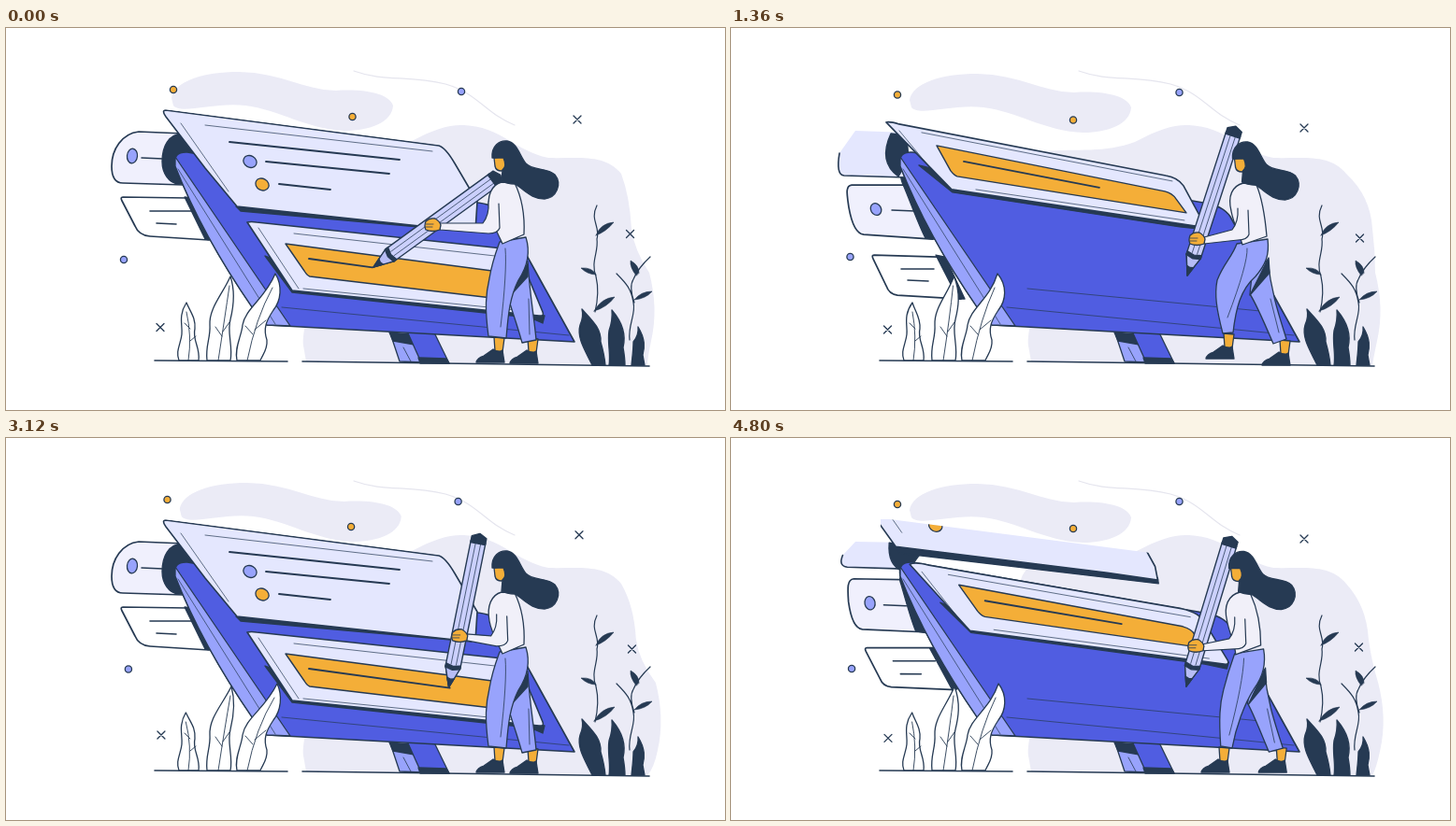
These frames come from a looping animation (769 by 409 pixels, 4880 ms). An HTML page with a canvas:

```html
<!DOCTYPE html>
<html lang="en">
<head>
<meta charset="utf-8">
<title>Card board</title>
<style>
html, body { margin: 0; height: 100%; overflow: hidden; background: #fff; }
canvas { display: block; }
</style>
</head>
<body>
<canvas width="769" height="409"></canvas>
<script>
const g = document.querySelector('canvas').getContext('2d');
const NAVY = '#263a53', BLUE = '#505de1', SKY = '#98a3fc', PALE = '#e4e7fe',
      MIST = '#ebebf6', GOLD = '#f4ae38', SHIRT = '#f1f0f9';
const LOOP = 4880;
const NUM = /-?\d+(\.\d+)?/g;
const TIMES = [0, .64, .85, 1.26, 1.36];

// The scene runs forward, backward, then forward again before the cut.
const phaseAt = ms => (ms < 1870 ? ms : ms < 3645 ? 3740 - ms : ms - 3550) / 1000;

// Smooth keyframe track, flat at both ends.
function track(p, v, times = TIMES) {
  const last = v.length - 1;
  if (p <= times[0]) return v[0];
  if (p >= times[last]) return v[last];
  const i = times.findIndex(x => x > p) - 1, h = times[i + 1] - times[i], k = (p - times[i]) / h;
  const slope = j => {
    if (j === 0 || j === last) return 0;
    const a = (v[j] - v[j - 1]) / (times[j] - times[j - 1]);
    const b = (v[j + 1] - v[j]) / (times[j + 1] - times[j]);
    return a * b <= 0 ? 0 : 2 * a * b / (a + b);
  };
  return v[i] + (v[i + 1] - v[i]) * k * k * (3 - 2 * k)
    + h * k * (1 - k) * (slope(i) * (1 - k) - slope(i + 1) * k);
}

// Blends paths that share the same commands.
function morph(s, ...paths) {
  const i = Math.max(0, Math.min(paths.length - 2, Math.floor(s)));
  const to = paths[i + 1].match(NUM);
  let n = 0;
  return paths[i].replace(NUM, v => (+v + (to[n++] - v) * (s - i)).toFixed(2));
}

function shape(d, fill, line = NAVY, width = 1.3) {
  const path = new Path2D(d);
  if (fill) { g.fillStyle = fill; g.fill(path); }
  if (line) { g.strokeStyle = line; g.lineWidth = width; g.stroke(path); }
}
const stroke = (d, width = 1.8) => shape(d, null, NAVY, width);

function oval(x, y, rx, ry, fill, tilt = 0) {
  g.beginPath();
  g.ellipse(x, y, rx, ry, tilt, 0, 7);
  g.fillStyle = fill; g.fill();
  g.strokeStyle = NAVY; g.lineWidth = 1.3; g.stroke();
}

function moved(x, y, draw) {
  g.save();
  g.translate(x, y);
  draw();
  g.restore();
}

function background(p) {
  const edge = track(p, [694, 701, 702, 698, 695]), bulge = track(p, [667, 672, 675, 680, 684]);
  moved(track(p, [-9, 0, 2, 5, 5]), track(p, [-1, 0, 0, 1, 1]), () => shape(
    'M186 76C189 58 220 48 258 48C305 49 325 67 362 68C395 66 419 72 423 84C422 102 398 111 372 111C332 110 300 88 265 84C232 80 196 94 188 84Z', MIST, null));
  shape(`M318 340C316 310 345 250 325 200C300 165 305 137 335 132C370 129 400 134 432 122C458 108 475 103 490 104C530 106 545 132 580 139C612 140 640 134 658 156Q${bulge} 180 ${bulge + 2} 215Q${bulge + 5} 238 ${edge - 6} 262Q${edge + 4} 300 ${edge - 4} 335Q${edge - 8} 354 686 361L321 357Z`, MIST, null);
  shape('M372 46C405 58 430 50 470 60C505 70 512 91 544 104', null, '#e5e5ee', 1.2);
}

function floaters(p) {
  const dots = [
    [[179, 172.5, 174, 178, 178], [66, 66, 67, 71, 71.5], GOLD],
    [[370.5, 369, 367.5, 366, 366], [95, 95, 96, 97, 98.5], GOLD],
    [[487, 483.5, 482.5, 479.5, 479.5], [68, 68, 67.5, 68, 69], SKY],
    [[126, 131, 131.5, 129, 127.5], [248, 247.5, 248, 247, 245], SKY]];
  for (const [x, y, fill] of dots) oval(track(p, x), track(p, y), 3.6, 3.6, fill);
  const crosses = [
    [[611, 613, 613, 613, 613], [98, 104, 105.5, 108, 107]],
    [[667.5, 669.5, 670, 671.5, 672.5], [220.5, 226, 226, 224, 225]],
    [[165, 166, 167, 168, 167.5], [320.5, 318, 318, 321.5, 323]]];
  for (const [x, y] of crosses)
    moved(track(p, x), track(p, y), () => stroke('M-4 -4L4 4M4 -4L-4 4', 1.3));
}

function hangingCards(s) {
  // white card
  shape(morph(s,
    'M125 181L194 182L217 227L154 223Q142 222 138 212L124 185Q122 181 125 181Z',
    'M146 226L217 226L241 271L172 268Q163 267 160 259L145 230Q143 226 146 226Z',
    'M153 243L221 245L246 290L178 286Q169 285 166 276L152 247Q150 243 153 243Z'), '#fff', NAVY, 1.7);
  shape(morph(s, 'M191 181L199 182L219 227L213 226Z', 'M213 226L222 226L243 270L238 272Z', 'M219 243L229 245L250 290L243 290Z'), NAVY);
  stroke(morph(s, 'M154 196L199 196M161 209L182 210', 'M174 240L219 240M182 254L204 254', 'M182 258L217 258M189 270L211 271'), 1.6);
  // spotted card
  shape(morph(s,
    'M190 113L142 111C124 113 113 130 113 148Q113 166 125 166L190 168Z',
    'M196 153L131 152C124 153 125 161 126 176Q130 205 141 206L206 209Z',
    'M192 168L129 168C122 169 124 178 126 192Q131 220 142 221L216 226Z'), '#f0f0fd', NAVY, 1.7);
  shape(morph(s,
    'M190 113C173 113 167 128 167 143C167 155 174 166 184 167L206 165L203 130Z',
    'M181 150C180 152 181 153 182 156C184 162 193 196 198 208L208 210L200 165Z',
    'M181 153C181 160 183 166 185 170C191 184 201 212 208 225L218 226L205 185Z'), NAVY);
  const spot = morph(s, '135 137', '149 178', '155 194').split(' ');
  oval(+spot[0], +spot[1], 5.5, 7.8 - Math.min(s, 2) * .6, SKY, .1 - .3 * Math.min(s, 2));
  stroke(morph(s, 'M145 139L168 140', 'M164 180L188 181', 'M172 195L197 196'), 1.5);
  // card arriving over the roller
  if (s > .1) {
    shape(morph(s,
      'M135 111L190 112L190 113L136 112Q134 112 135 111Z',
      'M133 111L190 112L184 141L124 139Q114 138 119 126Q122 111 133 111Z'.replace('Q122 111 133 111Z', 'Z'),
      'M133 110L190 112L187 160L121 158Q112 157 116 134Z'), PALE, null);
    stroke(morph(s, 'M190 113L136 112Q134 112 135 111', 'M184 141L124 139Q114 138 119 126', 'M187 160L121 158Q112 157 116 134'), 1.6);
    shape(morph(s,
      'M175 113L200 114L200 120L180 125Q172 120 175 113Z',
      'M169 112L208 117L196 133L183 143Q167 136 169 112Z',
      'M171 113L188 115L190 140L179 159Q157 143 171 113Z'), NAVY);
    if (s > .99 && s < 1.5) shape('M208 117L241 119L240 137L196 132Z', PALE, null);
  }
}

function board() {
  shape('M412 330L434 332L445 358L421 357Z', SKY);
  shape('M410 326L432 328L437 339L414 335Z', NAVY);
  shape('M426 318L455 320L474 359L444 358Z', BLUE);
  shape('M441 353L471 354L474 359L443 359Z', NAVY);
  stroke('M425 342L433 357', .8);
  shape('M181 148Q178 132 194 133L505 187Q526 190 534 202L608 336L279 318L264 300Q210 222 181 148Z', BLUE, NAVY, 1.6);
  shape('M181 138L304 319L279 318L264 300Q210 222 181 148Z', SKY);
  stroke('M184 151L288 317M295 299L602 329M317 279L566 303', .7);
}

function goldCard(s, lineEnd) {
  shape(morph(s,
    'M277 244L286 247L310 282L562 306L576 308L574 316L560 310L306 283Z',
    'M222 174L232 178L258 205L505 238L531 238L529 245L505 240L255 206Z',
    'M201 147L213 150L241 174L480 210L502 210L499 215L480 213L237 176Z'), NAVY);
  shape(morph(s,
    'M258 208Q262 207 268 208L531 236Q545 238 552 251L574 304Q576 309 570 308L306 281Z',
    'M189 133Q195 130 210 134L480 181Q500 185 506 197L530 236Q532 241 526 240L254 204Z',
    'M166 101Q170 100 180 103L465 158Q478 160 484 169L504 206Q504 212 497 212L236 173Z'), PALE, NAVY, 1.6);
  stroke(morph(s,
    'M308 220L532 245M318 279L556 303M270 214L313 279',
    'M230 144L490 190M280 203L510 234M202 141L248 199',
    'M204 112L472 164M262 173L485 206M180 110L228 168'), .7);
  shape(morph(s,
    'M299 231L520 260Q532 262 536 270L545 292L325 266Q322 265 319 260Z',
    'M242 155L482 200Q492 203 495 209L499 222L270 189Q266 188 262 183Z',
    'M220 126L464 175Q472 177 476 183L487 198L242 159Q239 158 235 153Z'), GOLD, NAVY, 1.4);
  stroke(morph(s,
    `M324 247L${lineEnd} ${247 + (lineEnd - 324) * .137}`, 'M270 172L416 197', 'M249 143L394 171'));
}

function dottedCard(s) {
  if (s >= .99) return;
  g.save();
  g.clip(new Path2D('M160 87L170 87L464 125L700 150V400H160Z'));
  shape(morph(s,
    'M246 191L478 214L502 214L498 218L251 196Z',
    'M173 113L400 140L455 148L456 154L178 121Z'), NAVY);
  shape(morph(s,
    'M171 88Q166 88 171 95L213 150L247 191L480 216L502 217L504 186L480 145Q470 128 463 126Z',
    'M114 12Q109 12 114 19L144 72L174 114L400 142L455 150L452 136L424 85Q412 59 406 56Z'), PALE, NAVY, 1.6);
  moved(-57 * s, -76 * s, () => {
    stroke('M213 104L456 132M187 102L238 175', .7);
    stroke('M239 122L421 141M278 143L410 156M292 167L347 173');
    oval(261, 143, 7.4, 6.2, SKY, .5);
    oval(274, 167.5, 7.4, 6.2, GOLD, .5);
  });
  g.restore();
}

function leftPlants(p) {
  const sway = track(p, [0, 2, 1, -2, -3]);
  shape(`M185 356C181 346 187 338 188 328C189 318 184 308 ${193 - sway / 3} 294C197 304 203 310 202 322C199 334 208 342 206 356Z`, '#fff');
  shape(`M215 356C213 340 219 332 218 318C217 300 231 286 ${240 + sway / 2} 266C246 284 243 300 240 312C236 326 243 340 240 356Z`, '#fff');
  shape(`M247 356C244 342 252 330 253 318C256 300 277 290 ${288 + sway} 263C296 276 294 292 286 302C278 314 275 322 279 334C280 345 274 350 272 356Z`, '#fff');
  stroke(`M195 356Q199 330 ${193 - sway / 3} 304M197 335L203 330M197 322L191 316M227 356Q234 310 ${239 + sway / 2} 276M231 330L224 320M232 325L239 315M258 356Q267 311 ${285 + sway} 278M264 328L256 319M266 323L278 313`, .9);
}

function rightPlants() {
  shape('M627 361C620 346 610 332 614 318Q618 309 616 301C627 313 637 322 636 336Q640 350 641 361Z', NAVY);
  shape('M645 361C647 349 643 337 645 324Q649 313 648 302C660 316 663 330 660 342Q662 353 662 361Z', NAVY);
  shape('M669 361C670 351 671 344 671 336Q677 329 676 320C684 333 683 342 681 350L683 361Z', NAVY);
  stroke('M630 304Q635 283 631 266C625 250 634 240 632 226C636 212 624 206 632 190M667 334C665 318 674 306 671 294C669 280 664 274 653 263M672 294Q666 277 671 269Q676 257 689 245', 1.2);
  for (const leaf of [
    'M631 222Q636 209 650 208Q642 218 631 222Z', 'M631 264Q622 264 615 257Q627 256 631 264Z',
    'M629 303Q637 289 651 288Q643 299 629 303Z', 'M674 265Q667 256 668 249Q677 254 677 262Z',
    'M672 291Q679 282 691 282Q684 290 672 291Z']) shape(leaf, NAVY, NAVY, .6);
}

function pencil(p) {
  moved(track(p, [393, 474, 475, 487, 488]), track(p, [256, 267, 267, 266, 265]), () => {
    g.rotate(track(p, [-36, -78.7, -78.5, -73, -72]) * Math.PI / 180);
    shape('M0 0L22 -8H159V8H22Z', '#cbd0fd', NAVY, 1.4);
    shape('M0 0L22 -8V8Z', '#b7bdf6');
    shape('M0 0L10 -3.7L9 0L10 3.7Z', NAVY);
    shape('M21 -8H25L23 0L25 8H21L19 0Z', NAVY);
    stroke('M25 -2.5H158M25 3H158', .7);
    shape('M157 -8H164L168 0L164 8H157Z', NAVY);
  });
}

function foot(x, y) {
  moved(x, y, () => {
    shape('M19 -27L30 -26L28 -11L20 -12Z', GOLD);
    shape('M0 0Q1 -5 8 -7L18 -14Q23 -10 28 -13L30 0Z', NAVY);
  });
}

function woman(p) {
  const w = track(p, [0, 0, .2, 1, 2]);
  const spot = (...points) => morph(w, ...points).split(' ').map(Number);
  foot(...spot('539 359', '565 358', '568 361'));
  foot(...spot('503 358', '503 358', '508 354'));
  shape(morph(w,
    'M540 255L558 250C560 285 565 310 567 334L552 337C546 315 540 300 537 288Z',
    'M556 262L571 248C574 285 584 310 591 332L576 336C565 310 558 292 553 284Z',
    'M557 265L574 248C578 285 587 310 594 333L580 338C568 310 560 292 555 285Z'), SKY);
  shape(morph(w, 'M537 289L558 252L558 266Z', 'M554 285L572 246L573 262Z', 'M555 286L575 246L576 262Z'), NAVY);
  shape(morph(w,
    'M528 229L556 224C561 240 558 255 548 270C538 290 537 310 535 332L516 330C512 300 513 285 517 268C520 250 524 240 528 229Z',
    'M539 231L570 226C573 243 569 256 560 268C549 285 540 310 536 332L524 330C522 300 523 285 527 270C532 250 535 242 539 231Z',
    'M541 231L574 226C576 243 572 253 561 266C545 280 540 300 537 326L526 327C519 300 517 285 520 270C527 252 536 245 541 231Z'), SKY);
  stroke(morph(w, 'M534 236Q536 260 529 320M559 290L560 328', 'M549 236Q548 262 533 318M574 290L582 326', 'M552 236Q553 252 531 310M577 290L586 326'), .8);
  shape(morph(w,
    'M530 165L544 166C551 180 555 200 554 221L531 231C527 222 519 208 517 196C514 180 519 168 530 165Z',
    'M545 165L556 167C562 180 567 200 567 222L540 232C540 222 533 208 531 196C527 180 532 168 545 165Z',
    'M548 166L562 168C567 180 571 200 573 223L547 232C544 222 537 208 535 196C531 180 536 169 548 166Z'), SHIRT);
  const hx = track(p, [456, 485, 486, 497, 498]), hy = track(p, [211, 212, 213, 223, 226]);
  const ex = track(p, [524, 533, 536, 547, 550]), ey = track(p, [214, 217, 218, 220, 221]);
  shape(`M${ex + 3} ${ey - 26}L${ex + 4} ${ey}Q${ex + 2} ${ey + 6} ${ex - 8} ${ey + 6}L${hx + 8} ${hy + 5}V${hy - 2}L${ex - 14} ${ey - 5}Q${ex - 7} ${ey - 14} ${ex - 8} ${ey - 28}`, SHIRT, NAVY, 1.2);
  moved(hx, hy, () => {
    shape('M-7 -4Q-3 -8 3 -7Q8 -4 9 0L8 5Q0 8 -7 5Q-9 1 -7 -4Z', GOLD);
    stroke('M-7 -1H1M-7 2H0', .8);
  });
  moved(...spot('0 0', '13 0.5', '16.5 1'), () => {
    shape('M522 139L535 137L536 148L530 153Q524 153 523 148Z', GOLD);
    shape('M520 139C519 126 528 120 536 121C547 123 549 136 556 145C563 153 579 149 587 157C595 167 589 182 576 183C561 183 555 173 544 167Q536 167 530 164L531 152Q536 148 532 139Z', NAVY);
  });
}

function render(now) {
  const p = phaseAt(now % LOOP);
  const lift = track(p, [0, 4, 73.5, 76, 105, 117], [.72, .85, 1.25, 1.26, 1.36, 1.6]);
  const s = lift < 76 ? lift / 76 : 1 + (lift - 76) / 29;
  g.clearRect(0, 0, 769, 409);
  g.lineJoin = g.lineCap = 'round';
  background(p);
  hangingCards(s);
  board();
  goldCard(s, track(p, [392, 475], [0, .64]));
  dottedCard(s);
  rightPlants();
  stroke('M159 356L301 357M317 357L688 362', 1.6);
  leftPlants(p);
  floaters(p);
  pencil(p);
  woman(p);
}

const start = performance.now();
function loop() {
  render(performance.now() - start);
  requestAnimationFrame(loop);
}
loop();
</script>
</body>
</html>
```
